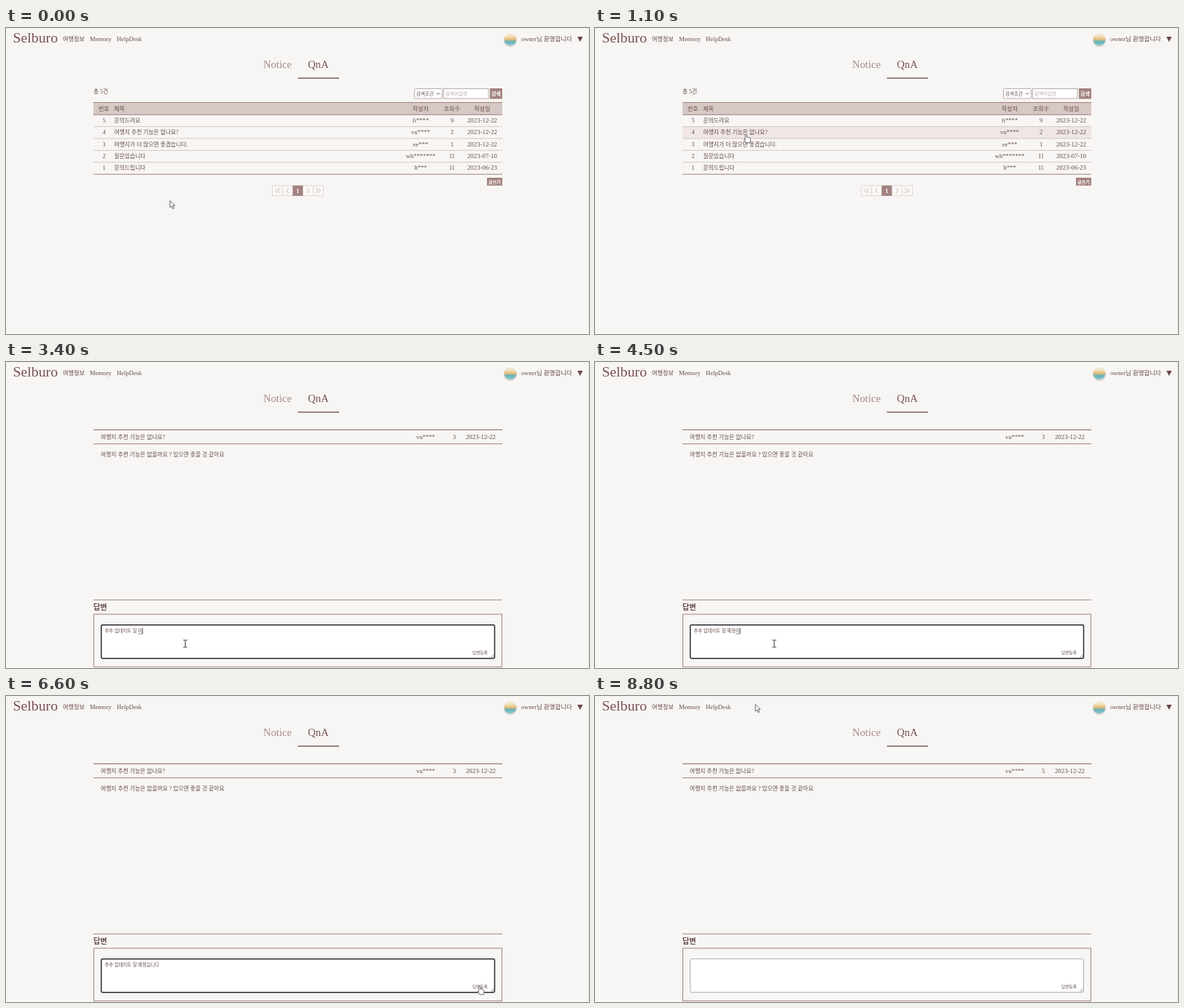
Recreate the animation shown at these times as an HTML page. Size 800 by 421 pixels, loop 8900 ms.

```html
<!DOCTYPE html>
<html lang="ko">
<head>
<meta charset="utf-8">
<title>QnA</title>
<style>
  html, body { margin: 0; width: 100%; height: 100%; overflow: hidden; background: #fff; }
  svg { display: block; width: 800px; height: 421px; }
  text { font-family: "Liberation Serif", "Noto Sans CJK KR", "Noto Sans CJK", serif; fill: #664b4a; white-space: pre; }
  .bold { font-weight: 700; }
  .mid { text-anchor: middle; }
  .white { fill: #fff; }
  .pale { fill: #b5aaa8; }
</style>
</head>
<body>
<svg id="stage" viewBox="0 0 800 421"></svg>
<script>
const LOOP = 8900, STEP = 100;
const BROWN = '#a38280', DARK = '#7d5a5c';

const text = (x, y, size, str, cls = '', extra = '') =>
  `<text x="${x}" y="${y}" font-size="${size}" class="${cls}" ${extra}>${str}</text>`;
const rect = (x, y, w, h, fill, stroke = 'none', extra = '') =>
  `<rect x="${x}" y="${y}" width="${w}" height="${h}" fill="${fill}" stroke="${stroke}" ${extra}/>`;
const line = (x1, y, x2, color = BROWN, width = 1, extra = '') =>
  `<path d="M${x1} ${y}H${x2}" stroke="${color}" stroke-width="${width}" ${extra}/>`;
const path = (d, color, width = 1, fill = 'none', extra = '') =>
  `<path d="${d}" stroke="${color}" stroke-width="${width}" fill="${fill}" ${extra}/>`;
const group = (id, body) => `<g id="${id}">${body}</g>`;

const ROW_TOP = 119.3, ROW_H = 16.35;
const TITLE = '여행지 추천 기능은 없나요?';
const rows = [
  [5, '문의드려요', 'fi****', 9, '2023-12-22'],
  [4, TITLE, 'vu****', 2, '2023-12-22'],
  [3, '여행지가 더 많으면 좋겠습니다.', 'ee***', 1, '2023-12-22'],
  [2, '질문있습니다', 'wh*******', 11, '2023-07-10'],
  [1, '문의드립니다', 'lt***', 11, '2023-06-23']
];

function header() {
  return rect(0, 0, 800, 420, '#f8f6f4') + rect(0, 0, 800, 1, '#f1f2ef') +
    rect(798.7, 0, 1.3, 420, '#e6f2e0') +
    text(9.5, 20, 19.8, 'Selburo', '', 'style="fill:#7a5150"') +
    text(78, 17.8, 8.15, '여행정보') + text(115, 18, 8.7, 'Memory') + text(152, 18, 8.6, 'HelpDesk') +
    `<circle cx="692" cy="17" r="9.3" fill="#ddd8d3"/>
     <circle cx="692" cy="15.8" r="8.3" fill="url(#photo)"/>` +
    text(707, 17.9, 8.45, 'owner님 환영합니다') +
    path('M784 12h7.5l-3.75 7z', 'none', 0, '#6b4646') +
    text(372.5, 54.5, 14.7, 'Notice', 'mid', 'style="fill:#a48b87"') +
    text(428.5, 54.5, 14.7, 'QnA', 'mid', 'style="fill:#775453"') +
    line(400.5, 69, 457, DARK, 1.6);
}

function listPage() {
  const cells = rows.map(([no, title, user, views, date], i) => {
    const y = ROW_TOP + ROW_H * i + 10.6;
    return text(134.5, y, 8.3, no, 'mid') + text(148.5, y, 7.8, title) +
      text(569, y, 8.6, user, 'mid') + text(612, y, 8.5, views, 'mid') +
      text(653.5, y, 8.8, date, 'mid') +
      (i < 4 ? line(120, ROW_TOP + ROW_H * (i + 1), 681, '#cfc3c0', .9) : '');
  }).join('');
  const heads = [[134.2, '번호'], [155.5, '제목'], [569, '작성자'], [612, '조회수'], [653.5, '작성일']]
    .map(([x, s]) => text(x, 113.6, 7.9, s, 'mid')).join('');
  const pager = ['M372.5 220.5l-3 3.3 3 3.3M376 220.5l-3 3.3 3 3.3', 'M388 220.5l-3 3.3 3 3.3',
    'M413 220.5l3 3.3-3 3.3', 'M425 220.5l3 3.3-3 3.3M428.5 220.5l3 3.3-3 3.3']
    .map(d => path(d, '#b9a5a2', .8)).join('');
  return text(120, 90, 7.8, '총 5건') +
    rect(560.5, 83.5, 38, 13.5, '#fff', '#b9abaa', 'rx="1"') + text(563, 92.6, 6.5, '검색조건') +
    path('M591 89.3l2 2 2-2', '#555') +
    rect(600.5, 83.5, 61.5, 13.5, '#fff', '#b9abaa') + text(603, 92.6, 6.5, '검색어입력', 'pale') +
    rect(664, 83, 17, 14.5, BROWN) + text(672.5, 92.9, 7, '검색', 'mid bold white') +
    rect(120, 102.5, 561, 16.8, '#d6c8c4') + line(120, 102.5, 681) + line(120, 119.3, 681) + heads +
    `<rect id="hover" x="120" width="561" height="${ROW_H - .6}" fill="#efe6e5"/>` +
    cells + line(120, 201.2, 681) +
    rect(660, 206, 21, 10.8, BROWN) + text(670.5, 213.6, 6.1, '글쓰기', 'mid bold white') +
    rect(365.5, 217, 70, 13.7, '#faf8f7', '#dfd8d5') +
    path('M379.5 217v13.7M421.5 217v13.7', '#dfd8d5') + pager +
    rect(393.3, 216.7, 14.2, 14.2, BROWN) + text(400.4, 226.5, 8.3, '1', 'mid bold white');
}

function detailPage() {
  return line(120, 93.3, 681, DARK, 1.1) + text(130, 105.5, 7.8, TITLE) +
    text(576, 105.5, 8.6, 'vu****', 'mid') + text(615.2, 105.5, 8.5, '3', 'mid', 'id="views"') +
    text(651.5, 105.5, 8.8, '2023-12-22', 'mid') + line(120, 112.6, 681) +
    text(130, 129.5, 7.8, '여행지 추천 기능은 없을까요 ? 있으면 좋을 것 같아요') +
    line(120, 327.3, 681) + text(120, 340.6, 10.2, '답변', 'bold') +
    `<g clip-path="url(#page)">
      <rect id="frame" x="120.5" y="347" width="560" height="72.5" fill="none" stroke="${BROWN}"/>` +
      group('comment',
        text(130, 363, 8.7, 'owner') + text(130, 372.3, 6.4, '추후 업데이트 할 예정입니다') +
        rect(643.5, 364.5, 27, 10, '#f8f6f4', '#b59d9b', 'stroke-width=".8"') +
        text(657, 371.8, 6.5, '삭제하기', 'mid') +
        line(130.5, 378.6, 670.5, '#b9aaa8', .9, 'stroke-dasharray="1 1"')) +
      group('area',
        '<rect id="field" x="130.7" y="361.7" width="539.8" height="46" rx="2" fill="#fff"/>' +
        text(661, 402, 5.7, '답변등록', '', 'text-anchor="end"') +
        path('M665.5 406.5l4-4M667.8 406.5l1.8-1.8', '#777', .8)) +
    '</g>' +
    group('entry', text(135.5, 372, 6.35, '', '', 'id="typed"') +
      path('', '#555', .7, 'none', 'id="underline"') + path('', '#222', .8, 'none', 'id="caret"'));
}

const cursors =
  group('arrow', path('M0 0V9.6L2.3 7.5L3.9 11.2L5.5 10.5L3.9 6.9H7z', '#444', .8, '#fff')) +
  group('hand', path('M-1.1 7.3V1Q0-.8 1.1 1V4.4Q2.2 3.6 2.9 4.8Q4.1 4.1 4.6 5.2Q6 4.8 6 6.3V8.6Q6 10.2 5 11.9H.3Q-1 9.7-2.9 7.4Q-2.6 5.9-1.1 7.3z', '#444', .8, '#fff')) +
  group('beam', path('M-2.6-4.8H-.7L0-4.3L.7-4.8H2.6M0-4.3V4.3M-2.6 4.8H-.7L0 4.3L.7 4.8H2.6', '#333', 1));

document.getElementById('stage').innerHTML = `<defs>
  <linearGradient id="photo" x2="0" y2="1">
    <stop offset=".2" stop-color="#f1e5cb"/><stop offset=".48" stop-color="#e8bd76"/>
    <stop offset=".68" stop-color="#62b3bd"/><stop offset="1" stop-color="#8cc9cd"/>
  </linearGradient>
  <clipPath id="page"><path d="M0 0H800V420H0z"/></clipPath></defs>` +
  header() + group('list', listPage()) + group('detail', detailPage()) + group('cursor', cursors);

const $ = Object.fromEntries([...document.querySelectorAll('[id]')].map(el => [el.id, el]));
const show = (el, on) => { el.style.display = on ? '' : 'none'; };
const set = (el, attrs) => { for (const k in attrs) el.setAttribute(k, attrs[k]); };

// [time, x, y] of the pointer's hot spot
const moves = [
  [0, 225, 237.5], [500, 225, 237.5], [800, 207.3, 146], [1300, 207.3, 146], [1800, 246, 387.5],
  [5700, 246, 387.5], [5800, 247, 386.5], [6000, 247, 386.5], [6400, 650, 399], [6700, 650, 399],
  [7200, 648, 368.5], [8200, 648, 368.5], [8700, 220, 11.5], [LOOP, 220, 11.5]
];

// [time, text]; a trailing "_" marks a syllable still being composed
const typing = [
  [1800, ''], [1900, 'ㅊ_'], [2000, '추_'], [2100, '추후_'], [2300, '추후 '], [2400, '추후 ㅇ_'],
  [2500, '추후 어_'], [2600, '추후 업_'], [2700, '추후 업데_'], [2900, '추후 업데이_'],
  [3000, '추후 업데이트_'], [3100, '추후 업데이트 '], [3200, '추후 업데이트 하_'],
  [3300, '추후 업데이트 할 '], [3400, '추후 업데이트 할 이_'], [3700, '추후 업데이트 할 ㅇ_'],
  [3900, '추후 업데이트 할 예_'], [4100, '추후 업데이트 할 예저_'], [4300, '추후 업데이트 할 예정_'],
  [4500, '추후 업데이트 할 예정이_'], [4600, '추후 업데이트 할 예정입_'],
  [4800, '추후 업데이트 할 예정입니_'], [5000, '추후 업데이트 할 예정입니다_'],
  [5100, '추후 업데이트 할 예정입니다']
];
const OPEN = 1200, FOCUS = 1800, POSTED = 6700, REMOVED = 8000;

function pointerAt(t) {
  const i = moves.findIndex(m => m[0] > t);
  const [t0, x0, y0] = moves[i - 1], [t1, x1, y1] = moves[i];
  const p = (t - t0) / (t1 - t0), e = p * p * (3 - 2 * p);
  return [x0 + (x1 - x0) * e, y0 + (y1 - y0) * e];
}

function drawEntry(t) {
  const on = t >= FOCUS && t < POSTED;
  show($.entry, on);
  if (!on) return;
  const raw = typing.filter(k => k[0] <= t).pop()[1];
  const composing = raw.endsWith('_'), str = raw.replace('_', '');
  $.typed.textContent = str;
  const left = 135.5, end = left + (str ? $.typed.getComputedTextLength() : 0);
  set($.underline, { d: composing ? `M${end - 5.9} 374H${end}` : '' });
  const lit = t < 5600 || (t >= 6100 && t < 6600);
  set($.caret, { d: lit ? `M${end + .5} 366V374` : '' });
}

function draw(t) {
  const [x, y] = pointerAt(t);
  const isList = t < OPEN, posted = t >= POSTED && t < REMOVED;
  const inside = (x0, y0, x1, y1) => x >= x0 && x <= x1 && y >= y0 && y <= y1;
  const shift = posted ? 31.8 : 0;

  show($.list, isList);
  show($.detail, !isList);
  const onRow = isList && inside(120, ROW_TOP, 681, 201);
  show($.hover, onRow);
  if (onRow) set($.hover, { y: ROW_TOP + ROW_H * Math.floor((y - ROW_TOP) / ROW_H) + .4 });

  $.views.textContent = t < POSTED ? 3 : posted ? 4 : 5;
  show($.comment, posted);
  set($.area, { transform: `translate(0 ${shift})` });
  set($.frame, { height: posted ? 110 : 72.5 });
  const focused = t >= FOCUS && t < POSTED;
  set($.field, { stroke: focused ? '#2b2930' : '#aaa3a2', 'stroke-width': focused ? 1.5 : .9 });
  drawEntry(t);

  const onButton = !isList && (inside(636, 394 + shift, 666, 405 + shift) || (posted && inside(643, 364, 671, 375)));
  const onField = !isList && inside(130, 361 + shift, 671, 408 + shift);
  const kind = onRow || onButton ? 'hand' : onField ? 'beam' : 'arrow';
  for (const id of ['arrow', 'hand', 'beam']) show($[id], id === kind);
  set($.cursor, { transform: `translate(${x} ${y})` });
}

const start = performance.now();
function tick() {
  const t = (performance.now() - start) % LOOP;
  draw(Math.floor(t / STEP) * STEP);
  requestAnimationFrame(tick);
}
tick();
</script>
</body>
</html>
```
